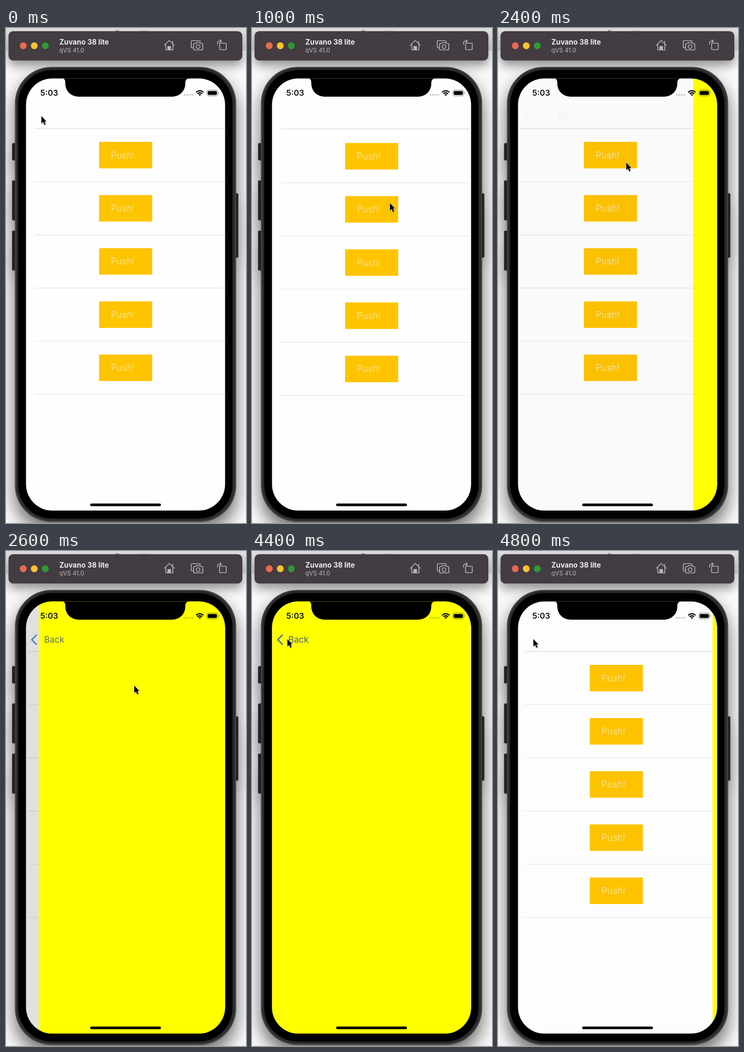
An HTML page for the animation above (5000 ms loop, 522 by 1074 pixels).

```html
<!DOCTYPE html>
<html lang="en">
<head>
<meta charset="utf-8">
<title>Push and pop</title>
<style>
  html, body { margin: 0; width: 100%; height: 100%; overflow: hidden; background: #fafafa; }
  svg { display: block; width: 522px; height: 1074px; font-family: Inter, sans-serif; }
  .bar { filter: drop-shadow(0 11px 11px rgba(0, 0, 0, .42)); }
  .body { filter: drop-shadow(0 20px 19px rgba(0, 0, 0, .58)); }
  .icon { fill: none; stroke: #bcb7bb; stroke-width: 1.7; stroke-linejoin: round; stroke-linecap: round; }
  .push { font-size: 20px; font-weight: 300; fill: #f8eab4; }
  .rule { stroke: #e7e7e9; stroke-width: 1.4; }
</style>
</head>
<body>
<svg viewBox="0 0 522 1074">
  <defs>
    <clipPath id="screen"><rect x="43.5" y="109.5" width="433" height="937.5" rx="57"/></clipPath>
  </defs>

  <rect width="522" height="1074" fill="#fafafa"/>
  <rect width="522" height="48" fill="#e0e0e0"/>
  <path d="M0 48H522" stroke="#c6c6c6"/>
  <path d="M238 8a4 3 0 0 1 8 0M290 7H310" fill="#888" stroke="#999"/>

  <g class="body">
    <g fill="#222" stroke="#3c3c3c">
      <rect x="13.5" y="250" width="9" height="37" rx="2"/>
      <rect x="13.5" y="331" width="9" height="86" rx="2"/>
      <rect x="13.5" y="440" width="9" height="86" rx="2"/>
      <rect x="496" y="359" width="9" height="139" rx="2"/>
    </g>
    <rect x="19.5" y="84.5" width="481" height="987" rx="79" fill="#2b2b2b"/>
  </g>
  <rect x="21" y="86" width="478" height="984" rx="78" fill="none" stroke="#484848" stroke-width="2"/>
  <rect x="26.5" y="91.5" width="466" height="973" rx="73" fill="#000"/>

  <g clip-path="url(#screen)">
    <rect x="43" y="109" width="434" height="938" fill="#fefefe"/>
    <g id="listPage">
      <path class="rule" d="M62 218H477"/>
      <g id="rows"></g>
    </g>
    <rect id="dim" x="43" y="109" width="434" height="938"/>
    <rect id="detail" x="43" y="109" width="434" height="938" fill="#ff0"/>
    <g id="nav">
      <path d="M66 182.500L56 192.500L66 202.500" fill="none" stroke="#3d70b4" stroke-width="2.8" stroke-linecap="round" stroke-linejoin="round"/>
      <text id="back" y="199" font-size="19" fill="#4c6180">Back</text>
    </g>
    <path d="M119 108H121Q129 109.500 129 119V121A28 28 0 0 0 157 149H362A28 28 0 0 0 390 121V119Q390 109.500 399 109.500V108Z"/>
    <text x="74.500" y="147" font-size="17.500" font-weight="600" fill="#111">5:03</text>
    <g fill="#000" fill-opacity=".22">
      <circle cx="388.500" cy="145" r="2"/><circle cx="394" cy="145" r="2"/>
      <circle cx="399.500" cy="145" r="2"/><circle cx="405" cy="145" r="2"/>
    </g>
    <g fill="none" stroke="#000" stroke-width="2.500">
      <path d="M413.500 139.500Q421.500 132.500 429.500 139.500M416.500 142.700Q421.500 138.500 426.500 142.700"/>
      <path d="M421.500 147.500L418.800 144.600Q421.500 142.500 424.200 144.600Z" fill="#000" stroke="none"/>
    </g>
    <rect x="436.700" y="134.700" width="24" height="12.600" rx="3.800" fill="none" stroke="#000" stroke-opacity=".45" stroke-width="1.200"/>
    <rect x="438.700" y="136.700" width="20" height="8.600" rx="2.200"/>
    <path d="M462 139Q464 141 462 143Z" fill-opacity=".5"/>
    <rect x="183" y="1031.700" width="154" height="5.800" rx="2.900"/>
  </g>

  <rect class="bar" x="5.500" y="7" width="508.500" height="63.500" rx="10" fill="#433c42"/>
  <circle cx="37.500" cy="38.500" r="7.400" fill="#eb6850"/>
  <circle cx="61.500" cy="38.500" r="7.400" fill="#fac22f"/>
  <circle cx="85.500" cy="38.500" r="7.400" fill="#309838"/>
  <text x="116" y="36" font-size="15.500" font-weight="700" fill="#eeebed">Zuvano 38 lite</text>
  <text x="116" y="53" font-size="13" fill="#bdb8bc">qVS 41.0</text>
  <g class="icon">
    <path d="M344.500 37.500L355 27L366 37.500M347.500 35.500V47.500H363V35.500M362.500 33V28.500"/>
    <path d="M352 47V40H358V47Z" fill="#bcb7bb"/>
    <path d="M407 43H405Q403 43 403 41V29.500Q403 27.500 405 27.500H420Q422 27.500 423 30"/>
    <path d="M410 33.500H413L414.500 31.500H421L422.500 33.500H426Q428 33.500 428 35.500V45.500Q428 47.500 426 47.500H410Q408 47.500 408 45.500V35.500Q408 33.500 410 33.500Z"/>
    <circle cx="417.800" cy="40.500" r="4"/>
    <rect x="464.500" y="33" width="14.500" height="14" rx="1.500"/>
    <path d="M460 35V33Q460 28.500 465 28.500H468M465.500 25.500L468.500 28.500L465.500 31.500"/>
  </g>

  <path id="cursor" d="M0 0V16L3.700 12.700L6.500 19L9.300 17.800L6.600 11.800H11Z" stroke="#fff" stroke-width="1.200" paint-order="stroke" style="filter: drop-shadow(0 1.500px 1px rgba(0, 0, 0, .3))"/>
</svg>

<script>
const LOOP = 5000, TICK = 200;
const TOP = 218, ROW = 115.4, SCREEN_LEFT = 43, SCREEN_WIDTH = 433;
const PUSH_START = 2369, POP_START = 4503, STIFFNESS = 0.0192;

// Pointer tip: [time, x, y], held until the next step.
const POINTER = [
  [0, 77, 191], [200, 347, 725], [400, 347, 917], [600, 345, 789],
  [800, 315, 520], [1000, 300, 380], [1200, 285, 305], [1400, 279, 292],
  [3000, 240, 272], [3200, 130, 217], [3400, 77, 191]
];

const $ = id => document.getElementById(id);
const move = (id, x, y) => $(id).setAttribute('transform', `translate(${x} ${y})`);

$('rows').innerHTML = Array.from({ length: 6 }, (_, i) => {
  const y = TOP + i * ROW;
  const button = `<rect x="202.500" y="${y + 29}" width="115.500" height="57.500" rx="1" fill="#ffc400"/>
    <text class="push" x="228" y="${y + 64.5}">Push!</text>`;
  return `<path class="rule" d="M62 ${y}H477"/>${i < 5 ? button : ''}`;
}).join('');

// Critically damped approach from 0 to 1.
function spring(elapsed) {
  const s = Math.max(0, elapsed) * STIFFNESS;
  return 1 - (1 + s) * Math.exp(-s);
}

function pullOffset(t) {
  if (t < 400) return 0;
  return t < 600 ? ROW : 82 * Math.exp((600 - t) / 113);
}

function draw(t) {
  const shown = spring(t - PUSH_START) - spring(t - POP_START);
  move('rows', 0, pullOffset(t));
  move('listPage', -0.3 * SCREEN_WIDTH * shown, 0);
  move('detail', SCREEN_WIDTH * (1 - shown) + 0.5, 0);
  $('dim').setAttribute('opacity', 0.125 * shown);
  $('nav').setAttribute('opacity', shown < 0.05 ? 0 : shown ** 1.5);
  $('back').setAttribute('x', 79 + 58 * (1 - shown));
  const [, x, y] = POINTER.findLast(([start]) => start <= t);
  move('cursor', x, y);
}

const origin = performance.now();
function frame() {
  const t = (performance.now() - origin) % LOOP;
  draw(Math.floor(t / TICK) * TICK);
  requestAnimationFrame(frame);
}
frame();
</script>
</body>
</html>
```
